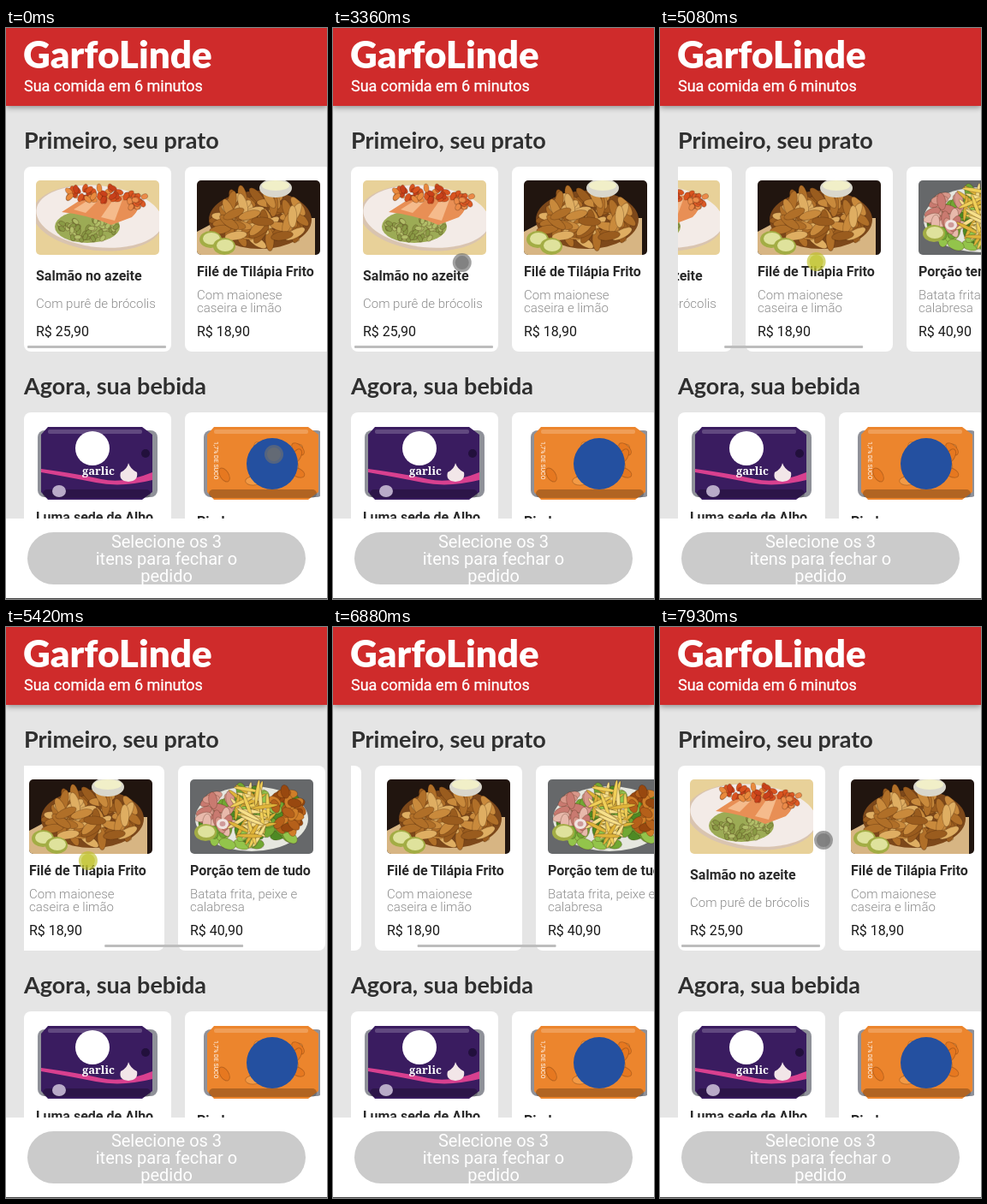
These frames come from a looping animation (375 px wide and 667 px high, 8 s). An HTML page:

```html
<!DOCTYPE html>
<html lang="pt-BR">
<head>
<meta charset="utf-8">
<style>
  html, body { margin: 0; width: 100%; height: 100%; overflow: hidden; background: #e5e5e5; }
  svg { display: block; }
  text { font-family: Roboto, sans-serif; }
  .brand { font: 900 44px Lato, sans-serif; fill: #fff; }
  .heading { font: 700 27px Lato, sans-serif; fill: #2f2f2f; }
  .tagline { font-size: 18px; fill: #fff; stroke: #fff; stroke-width: .3px; }
  .name { font-size: 16px; font-weight: 700; fill: #2a2a2a; }
  .note { font-size: 15px; font-weight: 300; fill: #8c8c8c; }
  .price { font-size: 16px; fill: #1a1a1a; }
  .button { font-size: 20px; fill: #fff; text-anchor: middle; }
  .header { filter: drop-shadow(0 2px 3px rgba(0, 0, 0, .38)); }
</style>
</head>
<body>
<svg id="stage" width="375" height="667" viewBox="0 0 375 667"></svg>
<script>
const LOOP = 8000;

const fill = color => `<rect width="144" height="87" fill="${color}"/>`;
const shape = (d, color) => `<path d="${d}" fill="${color}"/>`;
const oval = (x, y, rx, ry, color) => `<ellipse cx="${x}" cy="${y}" rx="${rx}" ry="${ry}" fill="${color}"/>`;
const lime = (x, y) => oval(x, y, 13, 10, '#a3ad45') + oval(x + 1, y - 1, 10, 7, '#dfe29c');

// Seeded pieces of food scattered inside an ellipse
function scatter(count, seed, [cx, cy, rx, ry], [length, width], colors) {
  const random = () => (seed = (seed * 16807) % 2147483647) / 2147483647;
  let out = '';
  for (let i = 0; i < count; i++) {
    const angle = random() * 2 * Math.PI, r = Math.sqrt(random());
    const x = cx + rx * r * Math.cos(angle), y = cy + ry * r * Math.sin(angle);
    out += `<g transform="translate(${x.toFixed(1)} ${y.toFixed(1)}) rotate(${Math.round(random() * 180)})">
      ${oval(0, 0, length, width, colors[i % colors.length])}</g>`;
  }
  return `<g stroke="#3a1800" stroke-opacity=".25">${out}</g>`;
}

const salmon = () => fill('#e8d199') +
  `<g transform="rotate(6 72 43)">${oval(72, 44, 76, 38, '#d9c4b0') + oval(74, 42, 74, 36, '#f3ebe7')}</g>` +
  oval(60, 54, 38, 19, '#9cab55') +
  scatter(50, 11, [60, 56, 34, 14], [4, 2.5], ['#b1be68', '#8a9a45']) +
  shape('M30 37L58 19L116 17Q126 30 112 43L88 52Q60 40 30 37Z', '#e88f55') +
  shape('M44 34L66 20H76L58 38ZM76 43L92 20H102L92 47Z', '#f5bb8c') +
  scatter(40, 5, [76, 16, 42, 8], [5, 3], ['#d9531f', '#e98a3e', '#c8401a']) +
  scatter(16, 8, [118, 24, 10, 11], [4, 3], ['#dd5a26', '#eb8a48']);

const fishFingers = () => fill('#21150f') + shape('M0 60L30 44H138V87H0Z', '#d7b583') +
  oval(74, 46, 60, 34, '#7d481a') +
  scatter(85, 23, [74, 45, 52, 29], [13, 5], ['#c98a3c', '#b06f28', '#dfae62', '#9a5c1e']) +
  oval(92, 9, 19, 11, '#d9d7cc') + oval(92, 6, 16, 6, '#f1efc8') + lime(16, 69) + lime(32, 77);

const mixedPlate = () => fill('#66686a') +
  oval(72, 46, 66, 38, '#e6e7df') +
  scatter(60, 17, [72, 46, 58, 34], [10, 6], ['#71a833', '#4e8a24', '#93c44b']) +
  scatter(24, 9, [34, 38, 20, 22], [10, 5], ['#d9978a', '#e8b9ab', '#c97a70']) +
  scatter(34, 41, [112, 38, 18, 24], [8, 5], ['#b5601a', '#d07e28', '#98480f']) +
  scatter(45, 3, [72, 39, 20, 30], [15, 2.2], ['#f0cf58', '#e0b53a', '#f7e08a']) +
  oval(38, 52, 7, 6, '#f0e4e0') + oval(38, 52, 3.5, 3, '#cf9a9a') + lime(18, 62);

const rolls = () => fill('#b8b0a5') + shape('M0 20L40 0H60L0 60Z', '#e9e7e2') +
  oval(84, 46, 66, 36, '#f3f0ea') +
  scatter(40, 13, [82, 44, 50, 26], [9, 7], ['#d98a35', '#efe6d4', '#b8652a', '#e8b065']);

const can = (x, body) => `<g transform="translate(${x})">
  <rect y="5" width="140" height="78" rx="8" fill="#8f9199"/>
  ${shape('M12 1H122L134 10V77L122 86H12L4 77V10Z', body)}
  <rect x="6" y="74" width="126" height="10" rx="5" opacity=".25"/>
  <rect x="12" y="4" width="110" height="5" rx="2" fill="#fff" opacity=".2"/></g>`;

const purpleCan = () => can(2, '#3a1c60') +
  shape('M6 50Q50 56 76 62T136 54V63Q100 72 70 66T6 54Z', '#d8408f') +
  oval(66, 26, 20, 20, '#fff') +
  `<text x="54" y="57" style="font:700 13px 'Noto Serif',serif" fill="#fff">garlic</text>` +
  shape('M108 43Q110 50 118 54Q120 64 108 65Q96 64 99 54Q107 50 108 43Z', '#f2e6e8') +
  oval(128, 32, 5, 5, '#22103c') + oval(27, 76, 8, 7, '#b9abc8');

const orangeCan = () => can(8, '#ec852d') +
  scatter(16, 19, [76, 44, 52, 30], [9, 5], ['#f39a45', '#e67820']) +
  oval(88, 44, 30, 30, '#2450a0') +
  `<text transform="translate(20 18) rotate(90)" font-size="7" fill="#fff">1,7% DE SUCO</text>`;

function card([picture, name, notes, price = ''], index) {
  const shift = notes.length > 1 ? 0 : 5;
  return `<g transform="translate(${index * 188})">
    <rect width="172" height="216" rx="8" fill="#fff"/>
    <g transform="translate(14 16)" clip-path="url(#photo)">${picture()}</g>
    <text class="name" x="14" y="${128 + shift}">${name}</text>
    ${notes.map((line, i) => `<text class="note" x="14" y="${155 + 2 * shift + 15 * i}">${line}</text>`).join('')}
    <text class="price" x="14" y="198">${price}</text></g>`;
}

const dishes = [
  [salmon, 'Salmão no azeite', ['Com purê de brócolis'], 'R$ 25,90'],
  [fishFingers, 'Filé de Tilápia Frito', ['Com maionese', 'caseira e limão'], 'R$ 18,90'],
  [mixedPlate, 'Porção tem de tudo', ['Batata frita, peixe e', 'calabresa'], 'R$ 40,90'],
  [rolls, 'Shushi variado', ['Tem tudo que você', 'não tive ontem'], 'R$ 50,90']
];
const drinks = [
  [purpleCan, 'Luma sede de Alho', ['Lata gelada', 'de alho']],
  [orangeCan, 'Pimbu', ['Lata gelada']]
];
const row = (list, y, id) =>
  `<svg x="21" y="${y}" width="354" height="216"><g id="${id}">${list.map(card).join('')}</g></svg>`;
const buttonLines = ['Selecione os 3', 'itens para fechar o', 'pedido'];

document.getElementById('stage').innerHTML = `
  <defs><clipPath id="photo"><rect width="144" height="87" rx="5"/></clipPath></defs>
  <rect width="375" height="667" fill="#e5e5e5"/>
  <rect class="header" width="375" height="91" fill="#cf2b2b"/>
  <text class="brand" x="20" y="47">GarfoLinde</text>
  <text class="tagline" x="21" y="74">Sua comida em 6 minutos</text>
  <text class="heading" x="21" y="141">Primeiro, seu prato</text>
  ${row(dishes, 162, 'track')}
  <rect id="bar" y="371" width="162" height="3" rx="1" fill="#bdbdbd"/>
  <text class="heading" x="21" y="428">Agora, sua bebida</text>
  ${row(drinks, 449, 'drinks')}
  <rect y="573" width="375" height="93" fill="#fff"/>
  <rect y="666" width="375" height="1" fill="#444"/>
  <rect x="25" y="589" width="325" height="61" rx="30.5" fill="#cbcbcb"/>
  ${buttonLines.map((line, i) => `<text class="button" x="187.5" y="${607 + 20 * i}">${line}</text>`).join('')}
  <g id="touch"><circle r="11" opacity=".65"/><circle r="8" opacity=".6"/></g>`;

const [track, bar, touch] = ['track', 'bar', 'touch'].map(id => document.getElementById(id));

// The pointer glides to a point, or holds the list: then x + scroll stays at grab
const moves = [
  { from: 1400, to: 2110, x: 203, y: 133 },
  { from: 2240, to: 3010, x: 122, y: 204, bow: -130 },
  { from: 3080, to: 3430, x: 154, y: 282 },
  { from: 3630, to: 3980, x: 147, y: 280 },
  { from: 4240, to: 4580, x: 292, y: 273 },
  { from: 4600, to: 5680, grab: 292 },
  { from: 5680, to: 6020, x: 200, y: 271 },
  { from: 6020, to: 7150, grab: 548 },
  { from: 7150, to: 7930, x: 191, y: 249, bow: 80 }
];

const ease = u => u * u * (3 - 2 * u);

// One drag to the left, then a slower one back
const scrollAt = time => Math.max(0, Math.min((time - 4652) * .255, (7611 - time) * .219));

function pointerAt(time) {
  let x = 313, y = 498, pressed = false;
  for (const move of moves.filter(move => move.from <= time)) {
    const end = Math.min(time, move.to);
    const u = (end - move.from) / (move.to - move.from);
    pressed = Boolean(move.grab);
    if (pressed) {
      x = move.grab - scrollAt(end);
    } else {
      x += (move.x - x) * ease(u);
      y += (move.y - y) * ease(u) + (move.bow || 0) * Math.sin(Math.PI * u);
    }
  }
  return { x, y, pressed };
}

function draw(time) {
  const scroll = Math.round(scrollAt(time));
  const { x, y, pressed } = pointerAt(time);
  track.setAttribute('transform', `translate(${-scroll})`);
  bar.setAttribute('x', 25 + .46 * scroll);
  touch.setAttribute('transform', `translate(${x} ${y})`);
  touch.setAttribute('fill', pressed ? '#bfc228' : '#6e6e6e');
}

const start = performance.now();
function tick() {
  draw((performance.now() - start) % LOOP);
  requestAnimationFrame(tick);
}
tick();
</script>
</body>
</html>
```
